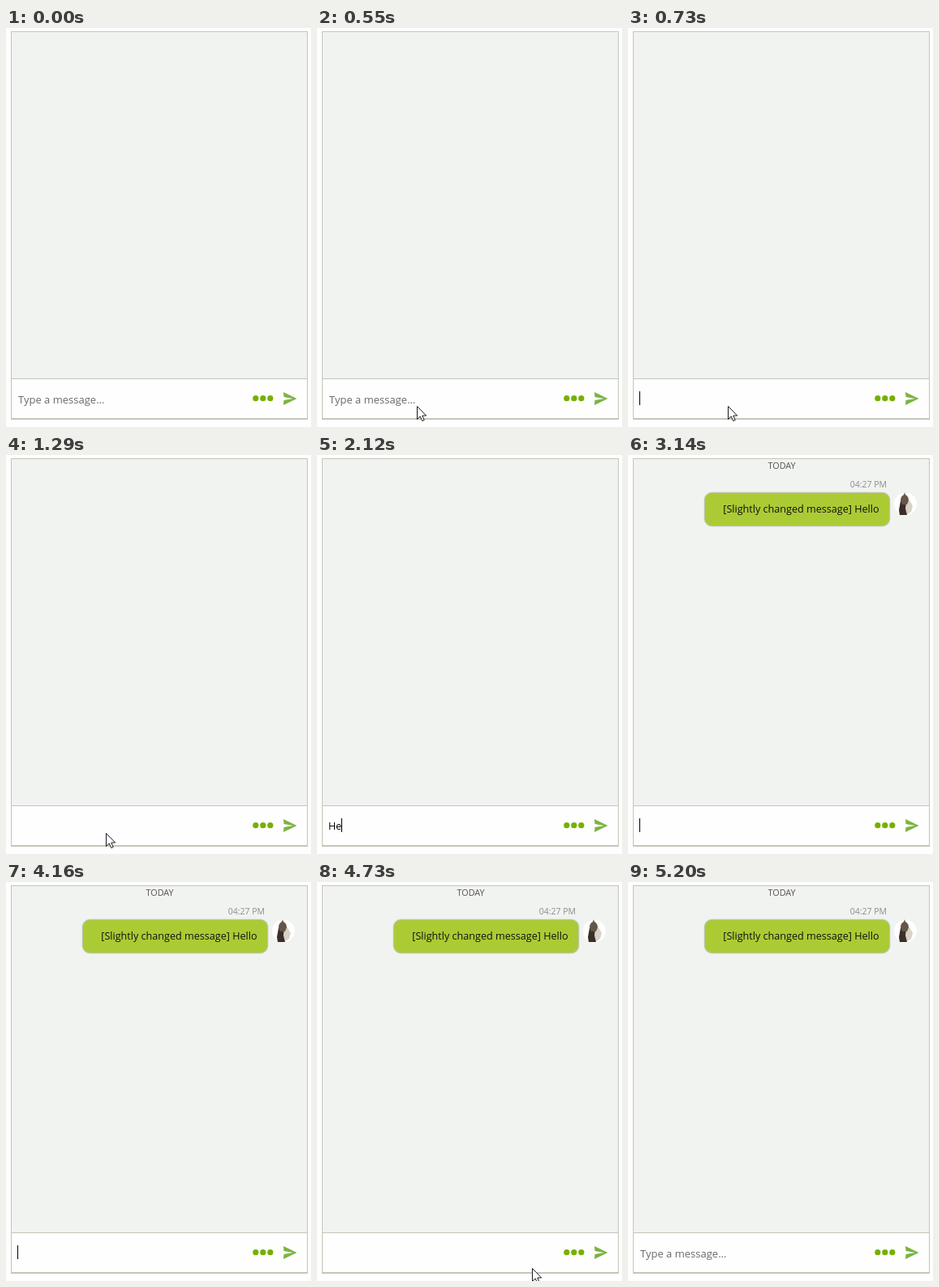
An HTML page for the animation above (5.3 s loop, 376 px wide and 492 px high).

```html
<!DOCTYPE html>
<html lang="en">
<head>
<meta charset="utf-8">
<title>Chat message</title>
<style>
  html, body { margin: 0; width: 100%; height: 100%; overflow: hidden; background: #fefefe; }
  svg { display: block; width: 376px; height: 492px; }
  text { font-family: "Open Sans", "Noto Sans", sans-serif; white-space: pre; }
  .crisp { shape-rendering: crispEdges; }
</style>
</head>
<body>
<svg viewBox="0 0 376 492">
  <g class="crisp">
    <rect x="6" y="4" width="366" height="479" fill="#c3c7b8"/>
    <rect x="7" y="5" width="364" height="427" fill="#f0f3f0"/>
    <rect x="7" y="433" width="364" height="48" fill="#fefefe"/>
  </g>

  <g id="chat">
    <text x="189.5" y="17" font-size="10.8" text-anchor="middle" fill="#555">TODAY</text>
    <text x="319" y="40" font-size="10.5" text-anchor="end" fill="#8c8c8c">04:27 PM</text>
    <rect x="93.5" y="45.5" width="230" height="43" rx="10" fill="#d8dcd3"/>
    <rect x="94.5" y="46.5" width="228" height="41" rx="9" fill="#abcb34" stroke="#bcc3a6"/>
    <text x="309.5" y="71" font-size="12.6" text-anchor="end" fill="#111">[Slightly changed message] Hello</text>
    <circle cx="342" cy="60.5" r="14" fill="#fefefe"/>
    <path d="M335 74 L334 68 L336 57 L347 56 L351 63 L349 70 L343 74Z" fill="#d9d1c6"/>
    <path d="M335 74 L334 68 L336 57 L343 57 L342 66 L344 74Z" fill="#3a2f27"/>
    <path d="M341 46 L342 49 Q346 51 346 56 L344 61 H338 L336 56 Q336 51 340 49Z" fill="#65564a"/>
  </g>

  <text id="hint" x="15" y="463" font-size="13" fill="#6a6a6a">Type a message...</text>
  <text id="typed" x="14" y="462" font-size="12.5" fill="#000"></text>
  <rect id="caret" class="crisp" y="448" width="1" height="17" fill="#000"/>

  <g fill="#76b000">
    <circle cx="307.8" cy="456.7" r="3.6"/>
    <circle cx="316.8" cy="456.7" r="3.6"/>
    <circle cx="325.8" cy="456.7" r="3.6"/>
  </g>
  <path d="M342 449 L358.5 457 L342 465 L342.5 459 L354 457 L342.5 455Z" fill="#7cb342"/>

  <path id="mouse" d="M.5 .5 V16.5 L4.2 13 L6.8 18.5 L9.2 17.5 L6.8 12 H11.7Z" fill="#fff" stroke="#1a1a22" stroke-linejoin="round"/>
</svg>
<script>
const LOOP = 5300;
const el = id => document.getElementById(id);
const [chat, hint, typed, caret, mouse] = ["chat", "hint", "typed", "caret", "mouse"].map(el);

// Each step lists only what changes at that time (ms).
const steps = [
  [0,    { chat: false, hint: true, text: "", caret: null, mouse: null }],
  [460,  { mouse: [132, 478] }],
  [550,  { mouse: [123, 466] }],
  [730,  { hint: false, caret: 14 }],
  [1290, { caret: null }],
  [1750, { text: "H", caret: 23, mouse: null }],
  [2120, { text: "He", caret: 30 }],
  [2210, { text: "Hel", caret: 33 }],
  [2300, { text: "Hell", caret: 36 }],
  [2580, { text: "Hello", caret: 44 }],
  [3140, { chat: true, text: "", caret: 14 }],
  [3600, { caret: null }],
  [4160, { caret: 14 }],
  [4620, { caret: null }],
  [4720, { mouse: [265, 476] }],
  [4820, { mouse: [262, 484] }],
  [4920, { mouse: null }],
  [5200, { hint: true }]
];

const show = (node, on) => node.setAttribute("visibility", on ? "visible" : "hidden");

function draw(t) {
  const s = {};
  for (const [at, change] of steps) if (at <= t) Object.assign(s, change);
  show(chat, s.chat);
  show(hint, s.hint);
  show(caret, s.caret !== null);
  show(mouse, s.mouse);
  typed.textContent = s.text;
  if (s.caret !== null) caret.setAttribute("x", s.caret);
  if (s.mouse) mouse.setAttribute("transform", `translate(${s.mouse})`);
}

const start = performance.now();
function tick() {
  draw((performance.now() - start) % LOOP);
  requestAnimationFrame(tick);
}
tick();
</script>
</body>
</html>
```
